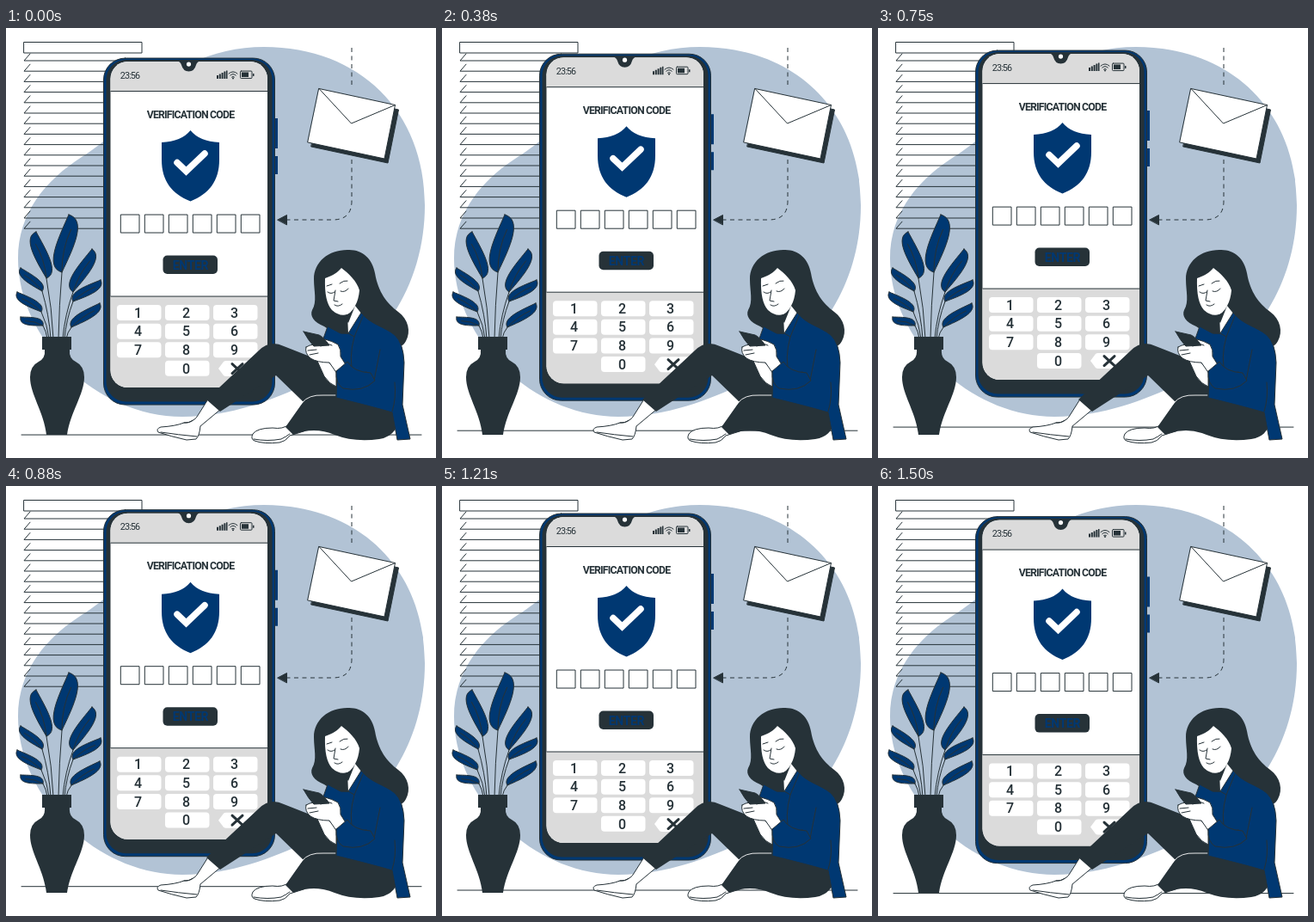
An HTML page for the animation above (1540 ms loop, 500 by 500 pixels).

```html
<!DOCTYPE html>
<html lang="en">
<head>
<meta charset="utf-8">
<title>Verification code</title>
<style>
  html, body { margin: 0; width: 100%; height: 100%; overflow: hidden; background: #fff; }
  svg { display: block; width: 100vw; height: 100vh; }
  .blue { fill: #003872; }
  .dark { fill: #263238; }
  .paper { fill: #fff; }
  .grey { fill: #dbdbdb; }
  .line { stroke: #263238; stroke-width: 1; stroke-linejoin: round; stroke-linecap: round; }
  .open { fill: none; }
  .light { fill: none; stroke: #fff; stroke-width: .9; stroke-linecap: round; }
  text { font-family: Roboto, "Open Sans", sans-serif; font-stretch: 75%; text-anchor: middle; }
</style>
</head>
<body>
<svg viewBox="0 0 500 500">
  <defs>
    <clipPath id="screen"><rect x="121.500" y="39" width="182.500" height="379" rx="20"/></clipPath>
  </defs>

  <path fill="#b2c3d5" d="M300 22C412 22 487 98 487 206C487 300 435 380 350 414C310 432 262 452 205 452C105 452 14 362 14 268C14 215 46 177 88 150C150 112 160 65 215 41C240 29 270 22 300 22Z"/>

  <g id="blinds" class="line open">
    <rect class="paper" x="21" y="16.500" width="137" height="12.500"/>
  </g>

  <g id="float">
    <path class="line" d="M18 473H483"/>
    <path class="blue" d="M311 105h5v35h-5zM311 149h5v21h-5z"/>
    <rect class="blue line" x="113.500" y="35" width="199" height="403" rx="25"/>
    <rect class="dark" x="116.500" y="37" width="193" height="397.500" rx="23"/>
    <g clip-path="url(#screen)">
      <path class="paper" d="M121 39h184v380H121z"/>
      <path class="grey line" d="M120 38H306V73.500H120zM120 312H306V420H120z"/>
    </g>
    <path class="dark" d="M198 37.500Q203 39 204 43Q206 50.500 212.500 50.500Q219 50.500 221 43Q222 39 227 37.500Z"/>
    <circle class="paper" cx="212.500" cy="42" r="2.600"/>

    <text class="dark" x="144" y="58.500" font-size="10.800" letter-spacing="-.9">23:56</text>
    <path class="dark" d="M245 55h2v4h-2zM247.800 53.500h2v5.500h-2zM250.600 52h2v7h-2zM253.400 50.500h2v8.500h-2zM256 49.500h1.500v9.500h-1.500z"/>
    <path class="line open" stroke-width="1.300" d="M259 53Q264 48.500 269 53M260.800 55Q264 52 267.200 55M262.500 57Q264 55.600 265.500 57"/>
    <circle class="dark" cx="264" cy="58.500" r="1"/>
    <rect class="line open" x="272.500" y="50" width="13.500" height="8.500" rx="1"/>
    <path class="dark" d="M274 51.500h8v5.500h-8zM287 53h1.500v3h-1.500z"/>

    <text class="dark" x="214.500" y="104.700" font-size="12.300" font-weight="600" letter-spacing="-.8">VERIFICATION CODE</text>
    <path class="blue" d="M214.500 119Q225 132 248 133V153C248 178 236 193 214.500 201.500C193 193 181 178 181 153V133Q204 132 214.500 119Z"/>
    <path class="light" style="stroke-width:7.500" d="M199 156.500L209.500 166.500L231 146"/>
    <g id="slots" class="paper line"></g>
    <rect class="dark" x="182.500" y="264.500" width="63.500" height="21.500" rx="5"/>
    <text class="blue" x="214.500" y="280.500" font-size="14" font-weight="700" letter-spacing="-.3">ENTER</text>
    <g id="keys"></g>
    <path class="paper" d="M247 396L253 388Q254 387 256 387H289Q292 387 292 390V402Q292 405 289 405H256Q254 405 253 404Z"/>
    <path class="line open" style="stroke-width:3" d="M263 390.500L275 401.500M275 390.500L263 401.500"/>
  </g>

  <g class="line">
    <path class="open" stroke-dasharray="5 4.500" stroke-linecap="butt" d="M402 23V70M402 153V201Q402 223 380 223H327"/>
    <path class="dark" d="M316 223L326.500 217.500V228.500Z"/>
    <path class="dark" d="M368 76L456.500 95L444 157L355 138Z"/>
    <path class="paper" d="M364 70.500L452.500 89.500L440 152L351 133Z"/>
    <path class="open" d="M364 70.500L401.500 111L452.500 89.500"/>
  </g>

  <g id="plant"></g>
  <path class="dark" d="M42 359H76V374H74Q73 384 81 388Q91 393 91 406C91 426 75 446 71 473H47C44 446 28 426 28 406Q28 393 38 388Q46 384 45 374H42Z"/>

  <g id="reader">
    <path class="paper line" d="M236 430L224 449Q219 459 207 459Q197 463 180 464Q174 466 177 470Q192 475 210 479L221 478Q225 474 226 463L250 443Z"/>
    <path class="line open" d="M207 459Q213 460 217 456M180 470Q200 473 222 475"/>
    <path class="dark" d="M233 432L294 375Q307 362 323 370L384 394L400 440L345 434L314 404L249 446Z"/>
    <path class="paper line" d="M329 461Q322 467 310 465Q292 465 287 472Q284 478 289 480Q300 484 318 482Q325 481 330 474L346 469Z"/>
    <path class="line open" d="M288 478Q304 481 320 478Q326 475 330 472"/>
    <path class="dark" d="M325 464L344 437Q352 425 369 427L405 424L456 444Q459 474 434 478Q405 482 382 473Q358 463 334 473Z"/>
    <path class="light" d="M329 456L344 436Q352 426 369 427L383 427"/>

    <path class="dark" d="M397 258C414 257 426 268 429 285C433 308 443 320 456 330C468 339 471 353 465 364C461 372 452 373 444 371L404 368C390 356 376 352 370 347C358 342 353 335 356 328C362 318 358 306 358 292C358 272 375 258 397 258Z"/>
    <path class="paper" d="M371 291C380 288 386 284 390 279C398 285 408 294 411 305Q410 316 406 323L414 333L398 356L397 333Q388 336 379 328Q370 318 371 291Z"/>
    <path class="line open" d="M374 307Q378 310 382 307M389 306Q394 308 398 303M383 305L381 317L386 318M382 322Q386 325 391 321M373 300L379 298M388 297Q393 293 397 294"/>
    <path class="dark" d="M392 335Q402 332 406 323L398 343Z"/>
    <path class="blue line" d="M398 355L413 331C424 345 440 347 452 357Q462 366 463 389L461 438L470 478L455 479L449 447Q425 440 384 430L385 398L371 388L369 361L374 347L389 355Z"/>
    <path class="line open" d="M398 355L405 359L415 335M405 359Q398 384 404 404M435 374L428 410Q420 422 392 418M449 446Q454 430 452 412M390 407L419 400"/>

    <path class="paper line" d="M361 385L370 405Q376 414 384 417L384 398L374 387Z"/>
    <path class="paper line" d="M349 371Q357 366 367 369L371 362Q379 364 386 368Q390 374 389 382L396 393L385 402L376 389Q362 389 354 384Q347 378 349 371Z"/>
    <path class="dark line" d="M346 353L364 357Q369 359 376 369L358 370Q352 364 346 353Z"/>
    <path class="line open" d="M351 375L361 374M353 380L363 378M366 370Q374 366 379 369"/>
    <path class="blue line" d="M384 399L397 388Q404 400 424 401L429 410Q415 424 392 419Q383 414 384 399Z"/>
  </g>
</svg>

<script>
const $ = id => document.getElementById(id);
const add = (id, markup) => $(id).insertAdjacentHTML('beforeend', markup);

// Window blinds
for (let i = 0; i < 17; i++) {
  const y = 38 + i * 12.2;
  add('blinds', `<path d="M28 ${y - 8}L21 ${y}H150"/>`);
}

// Code slots and keypad
for (let i = 0; i < 6; i++) {
  add('slots', `<rect x="${133.7 + i * 28}" y="217" width="21.300" height="21"/>`);
}
[..."123456789 0"].forEach((digit, i) => {
  if (digit === ' ') return;
  const x = 129 + (i % 3) * 56, y = 322 + Math.floor(i / 3) * 21.6;
  add('keys', `<rect class="paper" x="${x}" y="${y}" width="51.500" height="18" rx="4"/>
    <text class="dark" x="${x + 24.5}" y="${y + 14.7}" font-size="16" font-weight="500">${digit}</text>`);
});

// Leaves: tip, base, width (its sign sets the bend), stem foot
const leaves = [
  [73, 217, 65, 284, -23, 61], [35, 237, 47, 291, 18, 55],
  [17, 279, 42, 306, 12, 52], [13, 307, 41, 330, 12, 50],
  [17, 336, 43, 346, 11, 48], [100, 257, 78, 307, -17, 66],
  [110, 293, 78, 318, -13, 68], [109, 320, 76, 348, -13, 70]
];
for (const [tx, ty, bx, by, w, foot] of leaves) {
  const dx = bx - tx, dy = by - ty, len = Math.hypot(dx, dy);
  const side = (t, k) => `${tx + dx * t - dy / len * w * k} ${ty + dy * t + dx / len * w * k}`;
  add('plant', `
    <path class="line open" d="M${bx} ${by}Q${(bx + foot) / 2 + (foot - bx) * .3} ${(by + 360) / 2} ${foot} 361"/>
    <path class="blue line" d="M${tx} ${ty}C${side(.05, .95)} ${side(.55, .45)} ${bx} ${by}C${side(.95, -.95)} ${side(.4, -.35)} ${tx} ${ty}Z"/>
    <path class="line open" stroke-width=".6" d="M${side(.25, .2)}Q${side(.6, -.15)} ${bx} ${by}"/>`);
}

// Phone and floor bob at constant speed, 24 pictures per second
const LOOP = 1540, STEPS = 37, PEAK = 1490, RISE = 10;
function draw(now) {
  const step = Math.floor((now % LOOP + 5) / LOOP * STEPS) % STEPS;
  const phase = ((step * LOOP / STEPS - PEAK + LOOP) % LOOP) / LOOP;
  const lift = RISE * (1 - Math.abs(1 - 2 * phase));
  $('float').setAttribute('transform', `translate(0 ${(.7 - lift).toFixed(2)})`);
}
const start = performance.now();
function tick() {
  draw(performance.now() - start);
  requestAnimationFrame(tick);
}
tick();
</script>
</body>
</html>
```
